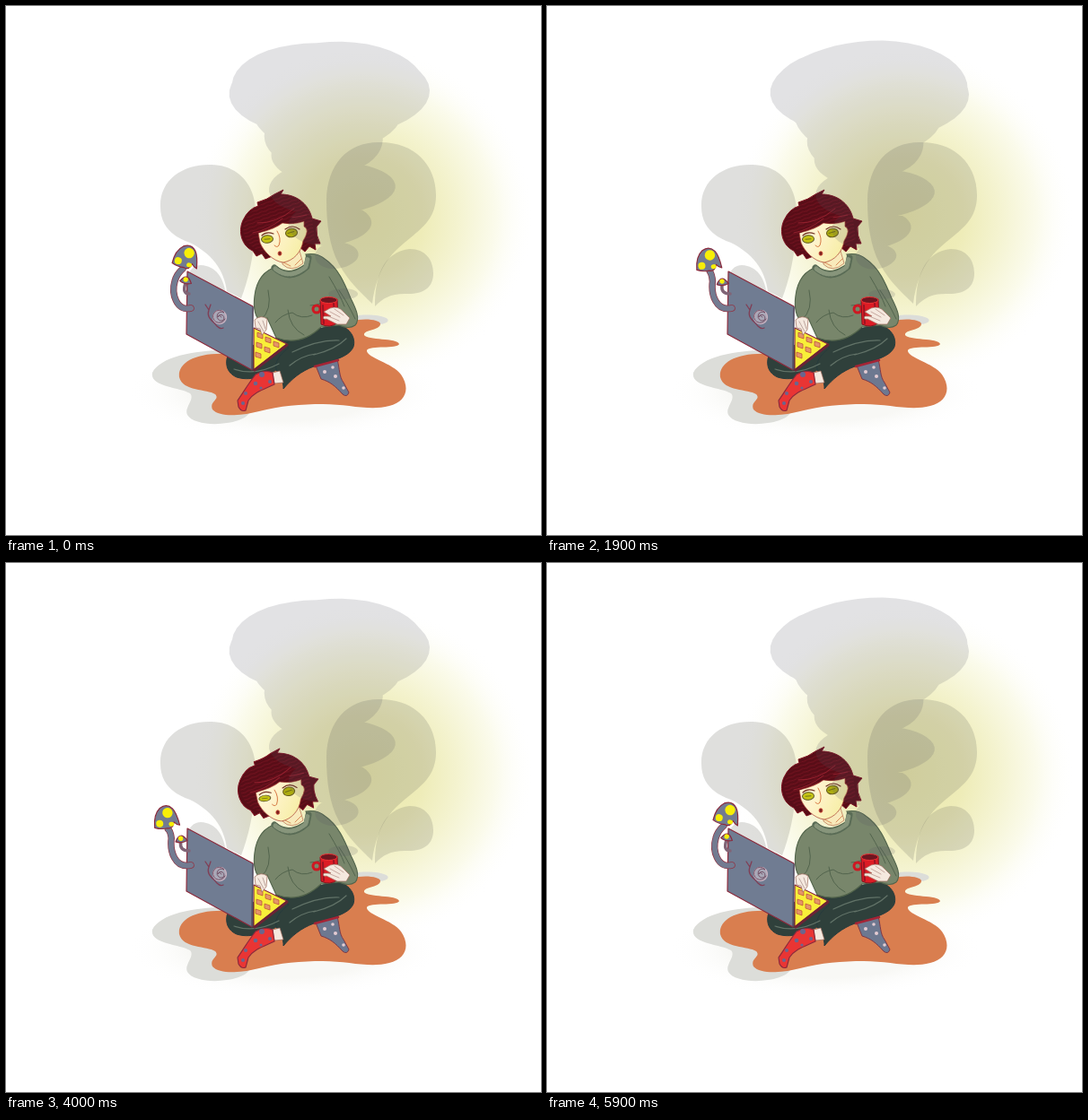
An HTML page that plays this animation: 596x590 px, repeating every 6000 ms.

```html
<!DOCTYPE html>
<html lang="en">
<head>
<meta charset="utf-8">
<title>Working on the rug</title>
<style>
html, body { margin: 0; width: 100%; height: 100%; overflow: hidden; background: #fff; }
svg { display: block; width: 100vw; height: 100vh; }
.line { fill: none; stroke-linecap: round; stroke-linejoin: round; }
.fold { stroke: #52644d; stroke-width: 1; }
.crease { stroke: #627368; stroke-width: 1.2; }
.ink { stroke: #8c2a3c; stroke-width: 1.2; stroke-linejoin: round; }
.skin { fill: #f5e9df; stroke: #a06a5c; stroke-width: .7; stroke-linejoin: round; }
.cap { fill: #727b91; }
.spot { fill: #f7ee08; }
.leaf { fill: #6f7064; fill-opacity: .22; }
</style>
</head>
<body>
<svg viewBox="0 0 596 590" preserveAspectRatio="none">
<defs>
  <radialGradient id="glow" gradientUnits="userSpaceOnUse" cx="398" cy="235" r="190">
    <stop offset="0" stop-color="#eae8ab"/>
    <stop offset=".35" stop-color="#eeecb8"/>
    <stop offset=".55" stop-color="#f4f3cf"/>
    <stop offset=".78" stop-color="#fbfbec"/>
    <stop offset="1" stop-color="#fff" stop-opacity="0"/>
  </radialGradient>
  <radialGradient id="floor">
    <stop offset=".6" stop-color="#f8f8f5"/>
    <stop offset="1" stop-color="#fff" stop-opacity="0"/>
  </radialGradient>
  <linearGradient id="face" x1="0" x2="1" y1=".3" y2=".7">
    <stop offset=".3" stop-color="#fff4cf"/>
    <stop offset="1" stop-color="#f5eda0"/>
  </linearGradient>
  <pattern id="strands" width="9" height="4" patternUnits="userSpaceOnUse" patternTransform="rotate(-20)">
    <path d="M0 1Q4 3 9 1" class="line" stroke="#7c1422" stroke-width=".8"/>
  </pattern>
</defs>

<ellipse cx="310" cy="430" rx="175" ry="55" fill="url(#floor)"/>
<circle cx="398" cy="235" r="190" fill="url(#glow)"/>

<g class="leaf">
  <path d="M172 224C171 194 197 176 229 177C262 178 281 203 278 240C277 272 272 300 262 326L246 318C243 294 229 276 205 264C184 257 172 244 172 224Z"/>
  <path d="M357 216C358 176 381 151 417 152C455 152 479 177 479 211C479 248 448 254 427 281C416 295 410 314 408 332C394 318 382 308 371 288C360 268 357 243 357 216Z"/>
  <path d="M411 335C411 302 420 274 450 271C467 271 476 283 476 298C476 315 464 322 444 321C428 321 420 326 411 335Z"/>
  <path d="M245 323C243 303 234 290 217 289C204 290 202 300 202 314C218 319 230 315 245 323Z"/>
</g>

<g fill="#dcddd9">
  <path d="M250 384C215 383 172 390 163 409C160 425 194 425 205 432C211 438 198 448 202 456C207 465 229 468 246 465C261 463 270 458 272 452L260 400Z"/>
  <path d="M370 350C382 344 415 342 425 349C429 355 412 357 390 355Z"/>
</g>
<path fill="#d97e4f" d="M385 352C398 347 418 350 417 355C416 362 398 361 399 367C402 373 436 370 438 377C436 383 405 378 402 384C401 392 431 398 440 411C451 427 445 442 427 446C405 452 382 444 353 444C329 444 305 446 282 452C263 457 238 459 230 450C226 441 239 439 233 433C224 427 197 430 193 414C191 399 209 386 248 388Z"/>

<!-- legs and socks -->
<g stroke="#263b3d" stroke-width="1" stroke-linejoin="round">
  <path fill="#6d7890" stroke="#7c3848" d="M345 401L369 394C372 406 371 413 376 420L382 431Q380 437 375 433C367 424 361 419 351 416Z"/>
  <path fill="#2f403b" d="M249 385C243 397 245 409 257 414C276 420 292 409 319 399L364 390L330 360L285 376Z"/>
  <path fill="#2f403b" d="M310 378C324 366 349 358 371 356C383 359 390 370 387 380C382 392 364 395 343 402C329 407 318 416 309 427C310 419 303 412 301 405C298 397 307 387 315 381Z"/>
</g>
<path class="line crease" d="M319 386Q348 372 371 373M343 389Q367 383 379 371M254 405Q278 413 304 399M316 401Q329 390 345 388"/>
<path class="skin" d="M297 409L305 407L309 420L299 421Z"/>
<path fill="#e93534" class="ink" d="M278 411Q289 405 297 409L299 422C286 428 276 431 270 440L267 451Q262 453 259 447L258 440C265 430 270 421 278 411Z"/>
<g fill="#6a668e">
  <circle cx="285" cy="411" r="3"/><circle cx="294" cy="419" r="2"/><circle cx="278" cy="421" r="2.3"/>
  <circle cx="284" cy="426" r="1.6"/><circle cx="267" cy="432" r="2"/><circle cx="264" cy="443" r="2"/>
</g>
<path class="line" stroke="#a52435" stroke-width="2.5" d="M344 402L370 395"/>
<g fill="#e4ccd2">
  <circle cx="355" cy="408" r="2"/><circle cx="364" cy="403" r="1.8"/><circle cx="367" cy="413" r="2"/><circle cx="376" cy="426" r="1.8"/>
</g>

<!-- body -->
<path fill="#f8eabb" stroke="#b76b4b" stroke-width=".7" d="M307 273L308 288Q318 298 331 287L326 270Z"/>
<path class="line" stroke="#cf7543" stroke-width=".8" d="M309 286L317 290M329 282L322 289"/>
<path fill="#78866b" stroke="#52644b" stroke-width="1.1" d="M302 291C287 294 279 307 277 323C275 337 278 349 284 351L291 348L301 370Q328 380 351 358L371 356Q382 361 389 356C395 349 390 338 384 326C377 309 370 292 355 282Q347 275 334 277Q338 287 329 291Q314 300 302 291Z"/>
<path class="line" stroke="#596b55" stroke-width="7" d="M299 292Q316 308 335 291L337 281"/>
<path class="line" stroke="#87957b" stroke-width="5" stroke-dasharray="1 2" d="M300 293Q316 306 334 291L336 282"/>
<path class="line fold" d="M284 350Q297 339 292 317M300 353Q307 344 319 342Q329 350 341 345M314 339Q316 359 332 367M339 334Q353 334 360 324M360 302Q372 322 377 335M371 317Q380 330 389 349"/>

<!-- laptop -->
<path fill="#f8ef39" class="ink" d="M276 359L313 377L276 406Z"/>
<path class="line" stroke="#6c2235" stroke-width="3" d="M313 378L277 406"/>
<g id="keys" fill="#e59568" stroke="#b85036" stroke-width=".7"></g>
<path fill="#707c92" class="ink" d="M202 296L275 335L274 406L201 366Z"/>
<path class="line" stroke="#4f586e" stroke-width="1.5" d="M275 336L274 405"/>
<g class="line" stroke="#813e55" stroke-width="1.3">
  <path d="M222 333L226 339L228 333M226 339C223 347 229 350 235 357Q239 361 242 359"/>
  <circle cx="238" cy="347" r="7.5" fill="#a9a8b7" stroke="#c7b0bf"/>
  <path stroke="#704b61" stroke-width=".9" d="M244 349A7 7 0 1 1 243 342A5 5 0 1 0 241 351A3.5 3.5 0 1 0 236 347Q237 344 240 347"/>
</g>
<path class="skin" d="M277 350Q284 344 291 349L290 361L285 367L283 360L278 359Z"/>
<path class="line" stroke="#a58c86" stroke-width=".7" d="M281 352L287 363M286 351L289 360"/>

<!-- cup -->
<circle cx="346" cy="338" r="4" fill="none" stroke="#cf1822" stroke-width="3"/>
<path fill="#dd1c25" stroke="#81131f" d="M350 328L369 327L370 353Q361 360 351 355Z"/>
<ellipse cx="359.500" cy="328" rx="9.500" ry="3.500" fill="#6e1620" stroke="#ee3435"/>
<path class="line" stroke="#9a1422" stroke-width="2" d="M353 334L354 354M365 332L366 342"/>
<path class="skin" d="M354 341L361 337Q370 334 376 341L383 348L379 355L369 355L357 349Q352 350 354 346L362 346Z"/>
<path class="line" stroke="#b28b84" stroke-width=".7" d="M361 341L372 347M359 346L371 351M366 338L376 345"/>

<!-- head -->
<g id="head">
  <path fill="#580d17" stroke="#7e1020" stroke-width="1" stroke-linejoin="round" d="M280 219Q291 216 299 210L309 205L306 210C323 210 337 220 341 237L351 240L346 246Q345 256 350 265L344 265L345 272L338 268L333 274L326 268L289 282L285 276L279 279L275 273C263 268 258 252 264 239Q270 226 281 223Z"/>
  <path fill="url(#strands)" d="M282 222L308 211Q330 212 341 237L344 262L330 270L289 277L276 270Q255 252 271 232Z"/>
  <path fill="url(#face)" stroke="#a93e32" stroke-width=".7" d="M281 253Q299 249 308 242Q322 244 332 240L332 246Q339 249 331 262C329 275 320 284 309 286C298 285 287 274 283 264Z"/>
  <path fill="#580d17" d="M277 255Q293 249 303 241Q319 245 337 238L332 224L287 226Z"/>
  <path fill="url(#strands)" d="M277 255Q293 249 303 241Q319 245 337 238L332 224L287 226Z"/>
  <path class="line" stroke="#93202e" stroke-width="1" d="M280 242Q301 243 321 226M275 253Q292 250 308 237M319 236L335 233"/>
  <path class="line" stroke="#d26c38" stroke-width=".9" d="M302 251Q307 259 304 267Q302 270 299 267"/>
  <path class="line" stroke="#713225" stroke-width="1.2" d="M285 256Q290 251 298 254M311 249Q319 243 327 249"/>
  <g id="eyeL"><ellipse rx="6.500" ry="4.300" fill="#c5c414" stroke="#5c572a"/><path class="line" stroke="#74751b" d="M-3 0H3"/></g>
  <g id="eyeR"><ellipse rx="6.500" ry="4.800" fill="#adac10" stroke="#655a1b"/><path class="line" stroke="#716d16" d="M-4 0L3 -1"/></g>
  <ellipse cx="305" cy="276" rx="2" ry="2.300" fill="#7b2220" stroke="#d24e38" stroke-width=".8"/>
</g>

<!-- mushrooms -->
<path id="stemEdge" class="line" stroke="#8f3646" stroke-width="7.500"/>
<path id="stem" class="line" stroke="#727b91" stroke-width="6"/>
<path id="twig" class="line" stroke="#806476" stroke-width="3.500"/>
<g id="small">
  <path d="M-6 2Q0 -10 7 2Q0 5 -6 2Z" class="cap ink"/><circle class="spot" cx="0" cy="-1" r="2.700"/>
</g>
<g id="big">
  <path d="M-14 10C-14 1 -11 -7 -6 -11Q2 -16 8 -9C12 -4 13 3 14 10Q10 9 8 6Q6 14 0 12Q-7 13 -14 10Z" class="cap ink"/>
  <circle class="spot" cx="2" cy="-5" r="5.700"/><circle class="spot" cx="-8" cy="6" r="4"/><ellipse class="spot" cx="5" cy="8" rx="3" ry="2.500"/>
</g>

<path id="smoke" fill="#57535f" fill-opacity=".17"/>
</svg>
<script>
const $ = id => document.getElementById(id);
const LOOP = 6000, STEP = 100, TAU = Math.PI * 2;
const set = (id, name, value) => $(id).setAttribute(name, value);

// Each row is one second in a puff's life: x, y, half width, half height.
const streams = [
  [[350, 325, 0, 0], [376, 321, 16, 6], [385, 265, 27, 15], [362, 203, 70, 30], [362, 200, 56, 34],
   [355, 145, 68, 41], [357, 138, 96, 46], [360, 94, 108, 54], [363, 79, 110, 52], [360, 94, 108, 54]],
  [[350, 325, 0, 0], [358, 330, 0, 0], [366, 296, 24, 9], [360, 243, 46, 24], [366, 213, 50, 26],
   [345, 166, 50, 30], [358, 175, 68, 38], [356, 118, 82, 46], [355, 90, 92, 44], [355, 105, 82, 46]],
  [[350, 325, 0, 0], [350, 320, 0, 0], [350, 290, 8, 8], [368, 278, 24, 15], [375, 220, 34, 17], [350, 160, 36, 20]]
];

function puff(rows, age) {
  const i = Math.min(Math.floor(age), rows.length - 2), f = age - i;
  const [x, y, w, h] = rows[i].map((v, n) => v + (rows[i + 1][n] - v) * f);
  let d = "";
  for (let n = 0; n < 48; n++) {
    const a = n / 48 * TAU;
    const r = 1 + .03 * Math.sin(2 * a + age) + .02 * Math.sin(3 * a - age * 1.5);
    d += (n ? "L" : "M") + (x + w * r * Math.cos(a)).toFixed(1) + " " + (y + h * r * Math.sin(a)).toFixed(1);
  }
  return d + "Z";
}

function drawSmoke(s) {
  let d = "";
  for (const rows of streams)
    for (let age = (s + 1) % 2; age <= rows.length - 1; age += 2) d += puff(rows, age);
  set("smoke", "d", d);
}

function drawMushrooms(s) {
  const c = Math.cos(s / 6 * TAU), u = (1 - c) / 2;
  const x = 186 + 15 * c, y = 280 + 9 * u ** 3, tilt = 13 * c;
  const bend = `M206 337C${190 - 3 * u} 341 ${184 - 2 * u} 321 ${188 - 5 * u} 307Q${190 - 9 * u} 299 ${x - 4 + 8 * u} ${y + 13}`;
  set("stem", "d", bend);
  set("stemEdge", "d", bend);
  set("big", "transform", `translate(${x} ${y}) rotate(${tilt})`);
  const sx = 200 - 7 * u, sy = 306 + 3 * u;
  set("small", "transform", `translate(${sx} ${sy}) rotate(${tilt})`);
  set("twig", "d", `M204 321Q${196 - 4 * u} 321 ${sx} ${sy + 3}`);
}

function drawHead(s) {
  const nod = Math.abs(s - 4) < .8 ? Math.cos((s - 4) * Math.PI / 1.6) : 0;
  set("head", "transform", `translate(${-2 * nod} ${2 * nod}) rotate(${-1.5 * nod} 308 285)`);
  const lid = .82 + .18 * Math.cos(s * Math.PI);
  set("eyeL", "transform", `translate(291 260) rotate(-5) scale(1 ${lid * (1 - .25 * nod)})`);
  set("eyeR", "transform", `translate(318 253) rotate(-8) scale(1 ${Math.max(lid, nod)})`);
}

for (let r = 0; r < 3; r++)
  for (let k = 0; k < 3 - r; k++) {
    const key = document.createElementNS("http://www.w3.org/2000/svg", "path");
    key.setAttribute("d", `M${280 + k * 9 - r} ${364 + k * 5 + r * 11}l6 2v5l-6 -2z`);
    $("keys").append(key);
  }

function frame(now) {
  const s = Math.floor(now % LOOP / STEP) * STEP / 1000;
  drawSmoke(s);
  drawMushrooms(s);
  drawHead(s);
  requestAnimationFrame(frame);
}
frame(performance.now());
</script>
</body>
</html>
```
